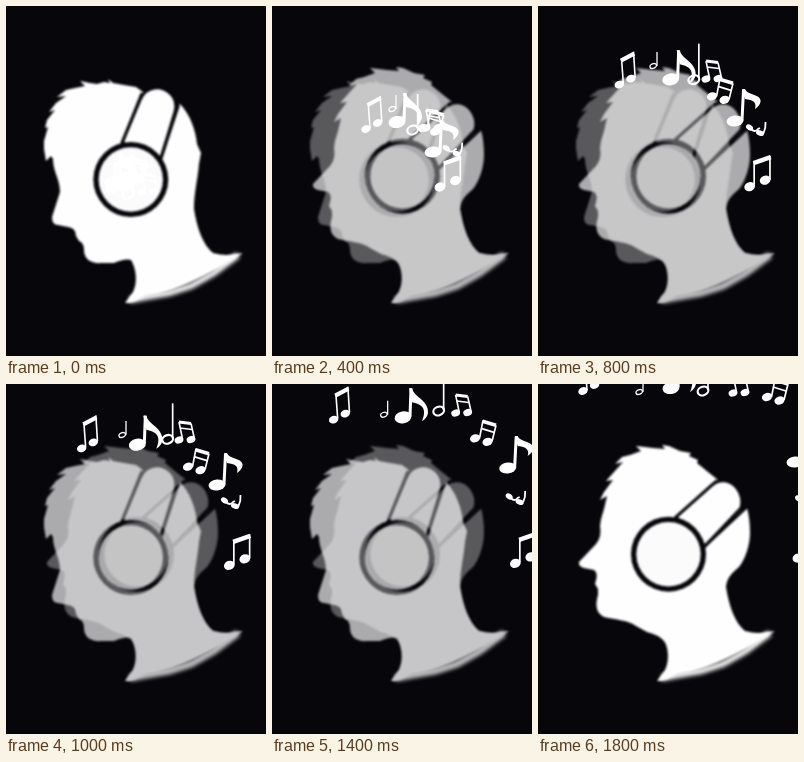
Recreate the animation shown at these times as an HTML page. Size 260 px wide and 350 px high, loop 1.9 s.

```html
<!DOCTYPE html>
<html lang="en">
<head>
<meta charset="utf-8">
<title>Headphones</title>
<style>
html, body { margin: 0; width: 100%; height: 100%; overflow: hidden; background: #06060b; }
svg { display: block; width: 100vw; height: 100vh; }
</style>
</head>
<body>
<svg id="stage" viewBox="0 0 260 350"></svg>
<script>
const LOOP = 1900, STEP = 100, STEPS_PER_PHASE = 6;
const stage = document.getElementById('stage');

// Shared neck and shoulder outline, from throat to nape
const neck = 'C130 262 132 276 127 286L119 297C128 298 132 292 141 290C155 288 170 283 185 276' +
  'C205 267 222 257 237 247C226 249 218 250 207 247C197 239 191 222 188 203';

const poses = [
  {
    head: 'M137 86L130 81L118 79L107 77L102 73L104 77L98 76L91 78L84 77L74 75L79 80L69 82L60 84L51 91' +
      'L60 90L50 97L43 106L49 104L41 114L39 122L42 121L38 135L38 143L40 155L45 150L47 153' +
      'C47 166 54 173 54 186L46 211Q46 219 52 219L62 221Q70 222 70 230L73 235Q78 237 78 244' +
      'C78 254 86 258 96 257L108 257Q119 252 125 254' + neck +
      'C188 186 192 172 193 158L195 147L191 138C190 125 184 108 174 98L160 110Z',
    band: 'M116 137L134 94C140 79 156 79 165 88Q172 95 169 106L155 152Z',
    edges: ['M116 137L136 87', 'M155 152L172.5 99'],
    cup: [124.8, 173.5]
  },
  {
    head: 'M180 96L170 88L159 79L160 76L151 72L153 69L142 67L131 62L124 61L127 65L115 64L107 63L98 62' +
      'L103 67L92 71L84 73L77 80L85 78L76 88L68 97L75 96L66 108L62 116L69 112L66 125L63 135' +
      'L62 142Q64 153 58 160L41 178Q40 182 46 184L56 186Q60 189 58 196L57 200L60 205L60 211' +
      'C57 221 58 229 66 233C78 236 90 236 98 242L109 248Q121 251 126 257' + neck +
      'C189 194 193 190 201 183C208 174 212 160 212 149Q212 135 209 124L190 132Z',
    band: 'M138 133L174 101C182 94 192 96 199 104Q206 113 203 124L167 162Z',
    edges: ['M138 133L179 96.5', 'M167 162L211 121'],
    cup: [130.5, 170.2]
  }
];

const oval = (x, y, rx, ry, turn = -20) =>
  `<ellipse rx="${rx}" ry="${ry}" transform="translate(${x} ${y}) rotate(${turn})"/>`;
const hollow = (x, y, rx, ry, w) =>
  `<g fill="none" stroke="#fff" stroke-width="${w}">${oval(x, y, rx, ry)}</g>`;
const line = (d, w) => `<path d="${d}" fill="none" stroke="#fff" stroke-width="${w}"/>`;
const fill = d => `<path d="${d}"/>`;

// Each key holds the note's anchor at the start of a phase, the last at the end
const notes = [
  { keys: [[108, 183], [87, 93], [70, 50], [45, 7]],
    art: oval(0, 0, 4.8, 3.8) + oval(11.6, -6, 4.8, 3.8) +
      line('M4 -1L2.2 -26M15.8 -7L14.2 -33', 1.6) + line('M1.6 -24L14.8 -31', 4.2) },
  { keys: [[136, 157], [118, 55], [121, 28], [105, -6]],
    art: hollow(-3.8, 14, 3.4, 2.3, 1.3) + line('M0 0V14', 1.3) },
  { keys: [[107, 176], [134, 86], [130, 48], [133, 4]],
    art: oval(0, 0, 8.5, 6, -10) + line('M7 -1L8 -29', 3) +
      fill('M6 -29H9C11 -20 26 -17 25 -4C24 0 22 2 19 4C24 -8 20 -13 9 -15Z') },
  { keys: [[122, 188], [150, 92], [167.5, 37], [165, 7]],
    art: hollow(0, 0, 5.5, 4.2, 2.2) + line('M5 -1V-36', 1.7) },
  { keys: [[136, 186], [163, 90], [178, 39], [195, 9]],
    art: oval(0, 0, 4.5, 3.5) + oval(12, -.5, 4.5, 3.5) +
      line('M3.5 -1L0 -18M15.5 -1L12 -16.5', 1.6) + line('M0 -18L12 -16.5', 3) + line('M1 -12L13 -10.5', 1.6) },
  { keys: [[120, 170], [166, 98], [190, 75], [229, 13]],
    art: oval(0, 0, 5.2, 4) + oval(12.5, 3.5, 5.2, 4) +
      line('M4.5 0L8 -18M17 3L21 -13', 1.7) + line('M7.5 -17L21 -13', 3.6) + line('M6 -10L19 -6', 1.7) },
  { keys: [[117, 180], [183, 129], [225, 87], [257, 78]],
    art: oval(0, 0, 8.5, 5.5, -5) + line('M7 -1L8.5 -31', 3) +
      fill('M7 -32H10C12 -26 24 -27 25.5 -21C26 -17 23 -14 20 -12C22 -19 18 -21 10 -22Z') },
  { keys: [[120, 175], [211, 128], [232, 113], [267, 116]],
    art: oval(-6.5, -1.5, 3.8, 2.6, 35) + oval(4, 4, 4.2, 2.7, 20) +
      line('M-5 0Q-1 4 2 0L4 -1M7.5 4Q10 -1 9.5 -7', 1.8) },
  { keys: [[104, 183], [200, 180], [235, 182], [260, 174]],
    art: oval(0, 0, 5.5, 4.5) + oval(15.5, -6.5, 5.5, 4.5) +
      line('M4.5 -1V-25M20.3 -7V-31', 1.7) + line('M3.8 -23.5L21 -29.5', 4.4) }
];

const cutout = ({ head, band, edges, cup: [x, y] }, i) => `
  <mask id="cut${i}" maskUnits="userSpaceOnUse" x="0" y="0" width="260" height="350">
    <g filter="url(#soft)">
      <path d="${head}" fill="#fff"/>
      <path d="${band}" fill="#fff" stroke="#000" stroke-width="3"/>
      <path d="${edges[0]}" stroke="#000" stroke-width="2.8"/>
      <path d="${edges[1]}" stroke="#000" stroke-width="3"/>
      <circle cx="${x}" cy="${y}" r="37.5"/>
      <circle cx="${x}" cy="${y}" r="32.2" fill="#fff"/>
    </g>
    <path d="M124 294L140 291L163 287L185 280L208 267L232 249" fill="none" stroke="#fff" stroke-width="6" filter="url(#fuzzy)"/>
  </mask>`;

const figure = ({ cup: [x, y] }, i) => `
  <g class="pose"><g mask="url(#cut${i})">
    <rect width="260" height="350" fill="#fefefe"/>
    <circle cx="${x}" cy="${y}" r="34" fill="#fbfbfb"/>
  </g></g>`;

const blur = (id, r) => `<filter id="${id}" filterUnits="userSpaceOnUse" x="0" y="0" width="260" height="350"
  color-interpolation-filters="sRGB"><feGaussianBlur stdDeviation="${r}"/></filter>`;

stage.innerHTML = `<defs>${blur('soft', .8)}${blur('fuzzy', 2)}${poses.map(cutout).join('')}</defs>
  <rect width="260" height="350" fill="#06060b"/>
  ${poses.map(figure).join('')}
  <g fill="#fff">${notes.map(n => `<g class="note">${n.art}</g>`).join('')}</g>`;

const figures = stage.querySelectorAll('.pose');
const marks = stage.querySelectorAll('.note');
const mix = (a, b, u) => a + (b - a) * u;

function draw(time) {
  const step = Math.floor((time % LOOP) / STEP);
  const phase = Math.min(Math.floor(step / STEPS_PER_PHASE), 2);
  const u = step / STEPS_PER_PHASE - phase;
  const raised = phase % 2 ? 1 - u : u;
  figures[0].setAttribute('opacity', 1 - raised);
  figures[1].setAttribute('opacity', raised);
  notes.forEach(({ keys }, i) => {
    const [a, b] = [keys[phase], keys[phase + 1]];
    marks[i].setAttribute('transform', `translate(${mix(a[0], b[0], u)} ${mix(a[1], b[1], u)})`);
  });
}

const start = performance.now();
function tick() {
  draw(performance.now() - start);
  requestAnimationFrame(tick);
}
tick();
</script>
</body>
</html>
```
